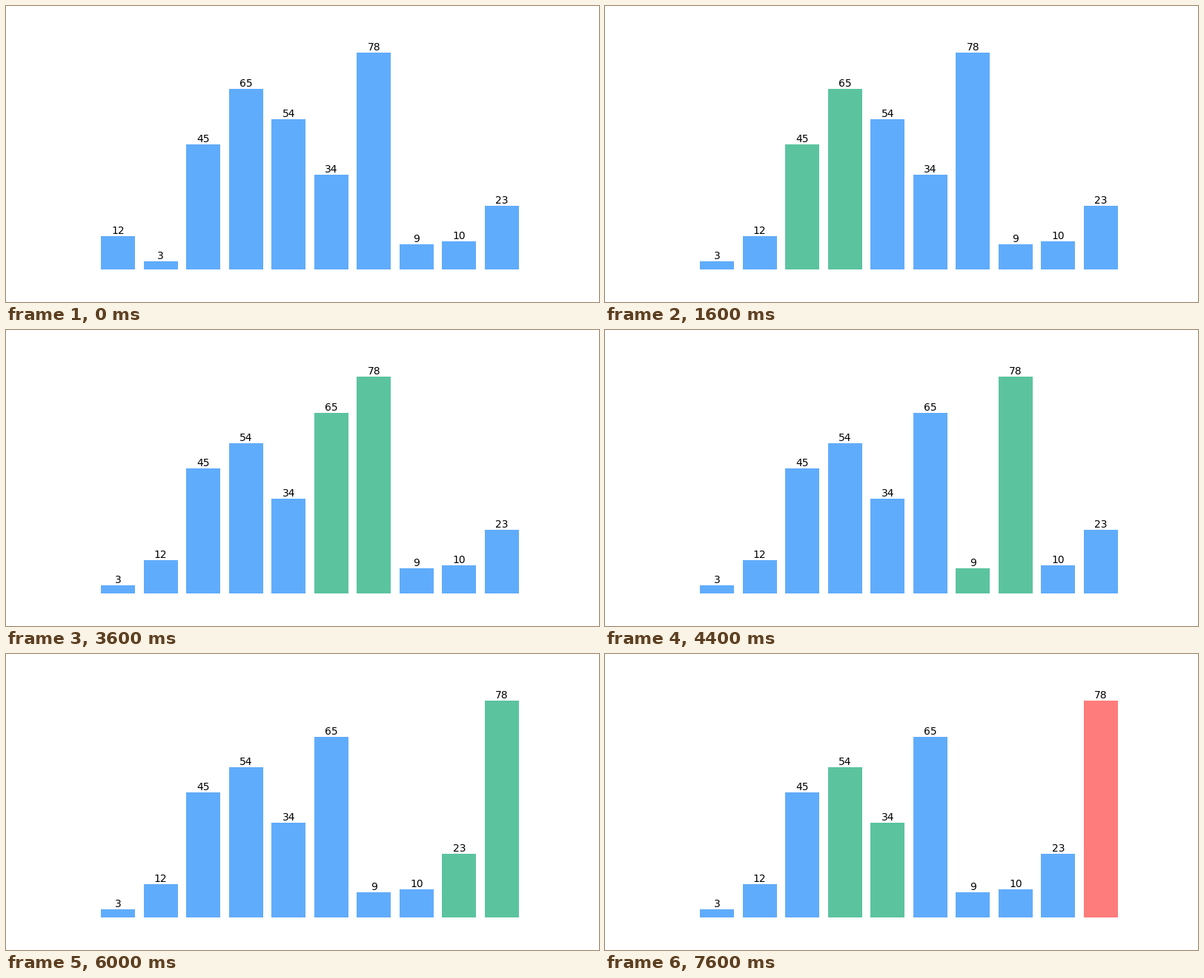
Recreate the animation shown at these times as a matplotlib script. Size 800 by 400 pixels, loop 8000 ms.

```python
import matplotlib.pyplot as plt
from matplotlib.animation import FuncAnimation

VALUES = [12, 3, 45, 65, 54, 34, 78, 9, 10, 23]
BLUE, GREEN, RED = "#60acfc", "#5bc49f", "#ff7c7c"
FRAMES, INTERVAL = 20, 400

plt.rcParams["font.family"] = "DejaVu Sans"


def bubble_sort_steps(values):
    """Yield (values, colors) for the start, every comparison and every swap."""
    data = list(values)
    n = len(data)
    yield data[:], [BLUE] * n
    for end in range(n - 1, 0, -1):
        for j in range(end):
            colors = [BLUE] * (end + 1) + [RED] * (n - 1 - end)
            colors[j] = colors[j + 1] = GREEN
            yield data[:], colors
            if data[j] > data[j + 1]:
                data[j], data[j + 1] = data[j + 1], data[j]
                yield data[:], colors


steps = [step for step, _ in zip(bubble_sort_steps(VALUES), range(FRAMES))]

fig, ax = plt.subplots(figsize=(8, 4), dpi=100, facecolor="white")
fig.subplots_adjust(left=0.125, right=0.9, bottom=0.11, top=0.88)
bars = ax.bar(range(len(VALUES)), VALUES, width=0.8, color=BLUE)
labels = [ax.text(i, v, str(v), ha="center", va="bottom", fontsize=10)
          for i, v in enumerate(VALUES)]
ax.set_xlim(-0.89, 9.89)
ax.set_ylim(0, max(VALUES) * 1.05)
ax.axis("off")


def update(frame):
    for bar, label, value, color in zip(bars, labels, *steps[frame]):
        bar.set_height(value)
        bar.set_facecolor(color)
        label.set_y(value)
        label.set_text(str(value))
    return [*bars, *labels]


anim = FuncAnimation(fig, update, frames=FRAMES, interval=INTERVAL,
                     repeat=True, repeat_delay=0)
plt.show()
```
